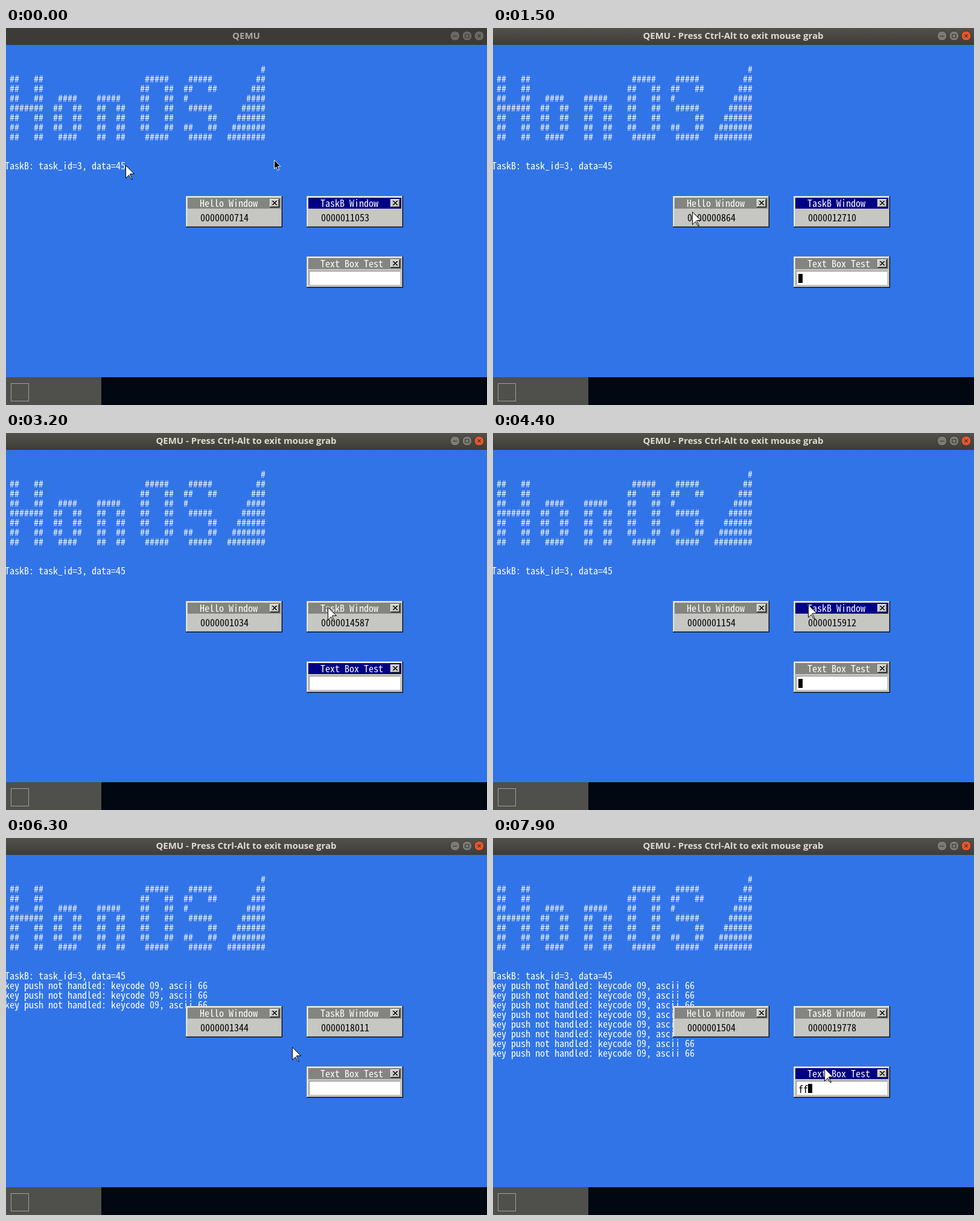
These frames come from a looping animation (797 px wide and 624 px high, 8 s). An HTML page:

```html
<!DOCTYPE html>
<html lang="en">
<head>
<meta charset="utf-8">
<title>Window focus demo</title>
<style>
  html, body { margin: 0; width: 100%; height: 100%; overflow: hidden; background: #3174e7; }
  svg { display: block; }
  text { white-space: pre; }
  .mono { font: 300 16px "Noto Sans Mono CJK JP", "Noto Sans Mono", monospace; }
  .caption { font: 700 15px "Open Sans", "Noto Sans", sans-serif; text-anchor: middle; }
</style>
</head>
<body>
<svg id="stage" width="797" height="624" viewBox="0 0 797 624">
  <defs>
    <linearGradient id="bar" x2="0" y2="1">
      <stop offset="0" stop-color="#53524a"/><stop offset="1" stop-color="#3d3c37"/>
    </linearGradient>
  </defs>
</svg>
<script>
const LOOP = 8000, STEP = 100;
const GRAB = 1000;          // host hands the mouse to the guest
const GLIDE = 400;          // pointer travel time before each stop
const CLICK_DELAY = 400;    // pause between arriving and clicking
const KEY_REPEAT = 145;
const stage = document.getElementById('stage');

function add(parent, tag, attrs, content) {
  const el = document.createElementNS('http://www.w3.org/2000/svg', tag);
  for (const key in attrs) el.setAttribute(key, attrs[key]);
  if (content !== undefined) el.textContent = content;
  parent.appendChild(el);
  return el;
}
const rect = (parent, x, y, width, height, fill) =>
  add(parent, 'rect', { x, y, width, height, fill, 'shape-rendering': 'crispEdges' });
// y is the top of the 16px character cell
const mono = (parent, x, y, fill, content = '') =>
  add(parent, 'text', { x, y: y + 14, fill, class: 'mono' }, content);
const show = (el, on) => el.setAttribute('visibility', on ? 'visible' : 'hidden');
const place = (el, x, y) => el.setAttribute('transform', `translate(${Math.round(x)} ${Math.round(y)})`);
const clamp = (v, lo, hi) => Math.min(hi, Math.max(lo, v));
const smooth = k => k * k * (3 - 2 * k);
const digits = n => String(Math.round(n)).padStart(10, '0');

// Desktop
rect(stage, 0, 0, 797, 624, '#3174e7');
rect(stage, 0, 578, 797, 46, '#010811');
rect(stage, 0, 578, 158, 46, '#4f4f4b');
add(stage, 'rect', { x: 8.5, y: 588.5, width: 29, height: 29, fill: 'none', stroke: '#a0a09c' });

// Console: lettering followed by a growing triangle
const lettering = [
  '',
  ' ##   ##                     #####    #####',
  ' ##   ##                    ##   ##  ##   ##',
  ' ##   ##   ####    #####    ##   ##  #',
  ' #######  ##  ##   ##  ##   ##   ##   #####',
  ' ##   ##  ##  ##   ##  ##   ##   ##       ##',
  ' ##   ##  ##  ##   ##  ##   ##   ##  ##   ##',
  ' ##   ##   ####    ##  ##    #####    #####'
];
lettering.forEach((row, i) =>
  mono(stage, -2, 60 + 16 * i, '#fff', row.padEnd(53 - i) + '#'.repeat(i + 1)));
mono(stage, -2, 220, '#fff', 'TaskB: task_id=3, data=45');
const keyLines = Array.from({ length: 8 }, (_, i) =>
  mono(stage, -2, 236 + 16 * i, '#fff', 'key push not handled: keycode 09, ascii 66'));

// Guest windows
function closeButton(parent, x, y) {
  const g = add(parent, 'g', { transform: `translate(${x} ${y})` });
  rect(g, 0, 0, 16, 14, '#000');
  rect(g, 0, 0, 15, 13, '#fff');
  rect(g, 1, 1, 14, 12, '#848480');
  rect(g, 1, 1, 13, 11, '#c6c6c2');
  for (let row = 0; row < 7; row++) {
    const inset = Math.min(row, 6 - row);
    rect(g, 4 + inset, 3 + row, 2, 1, '#000');
    rect(g, 10 - inset, 3 + row, 2, 1, '#000');
  }
}
function makeWindow(x, y, title) {
  const g = add(stage, 'g', { transform: `translate(${x} ${y})` });
  rect(g, 0, 0, 160, 52, '#000');
  rect(g, 0, 0, 159, 51, '#c6c6c2');
  rect(g, 1, 1, 158, 50, '#848480');
  rect(g, 1, 1, 157, 49, '#fff');
  rect(g, 2, 2, 156, 48, '#c6c6c2');
  const bar = rect(g, 3, 3, 154, 18, '#848480');
  mono(g, 23, 4, '#fff', title);
  closeButton(g, 139, 5);
  return { g, bar };
}
const hello = makeWindow(298, 278, 'Hello Window');
const taskB = makeWindow(498, 278, 'TaskB Window');
const textBox = makeWindow(498, 378, 'Text Box Test');
const helloCount = mono(hello.g, 24, 28, '#000');
const taskCount = mono(taskB.g, 24, 28, '#000');
rect(textBox.g, 4, 24, 151, 23, '#848480');
rect(textBox.g, 5, 25, 150, 22, '#fff');
const typed = mono(textBox.g, 8, 30, '#000');
const caret = rect(textBox.g, 8, 29, 7, 15, '#000');

// Pointers
const pointer = add(stage, 'path', {
  d: 'M.5.5V21.5L5.5 16.5L9.5 23.5H11.5L7.5 15.5V14.5H14.5Z', fill: '#fff', stroke: '#000'
});
const hostPointer = add(stage, 'path', {
  d: 'M.5.5V15L3.8 12L6.2 17.5L8.6 16.5L6.3 11.2H10.8Z', fill: '#000', stroke: '#fff'
});

// Host title bar
const bar = rect(stage, 0, 0, 797, 28, '#3c3b37');
const caption = add(stage, 'text', { x: 398, y: 18, class: 'caption' });
const buttons = ['M-3.5.5H3.5', 'M-3-2.5H3V3H-3Z', 'M-2.5-2.5L2.5 2.5M2.5-2.5L-2.5 2.5'].map((d, i) => {
  const g = add(stage, 'g', { transform: `translate(${744 + 20 * i} 13)` });
  const disc = add(g, 'circle', { r: 8, stroke: '#35342f' });
  add(g, 'path', { d, fill: 'none', stroke: '#3a3934', 'stroke-width': 1.2 });
  return disc;
});

// Pointer stops; a stop with a focus entry ends in a click (null is the desktop)
const stops = [
  { at: -CLICK_DELAY, x: 198, y: 227, focus: taskB },
  { at: 1500, x: 330, y: 304, focus: hello },
  { at: 2500, x: 540, y: 388, focus: textBox },
  { at: 3200, x: 533, y: 288 },
  { at: 3700, x: 522, y: 284, focus: taskB },
  { at: 5300, x: 541, y: 374 },
  { at: 5700, x: 474, y: 346, focus: null },
  { at: 7000, x: 549, y: 381, focus: textBox }
];

function pointerAt(t) {
  let { x, y } = stops[0];
  for (const stop of stops.slice(1)) {
    const k = smooth(clamp((t - stop.at) / GLIDE + 1, 0, 1));
    x += (stop.x - x) * k;
    y += (stop.y - y) * k;
  }
  return [x, y];
}
const focusAt = t => stops.filter(s => 'focus' in s && s.at + CLICK_DELAY <= t).pop().focus;
const presses = (t, from, max) => clamp(Math.floor((t - from) / KEY_REPEAT) + 1, 0, max);

function render(t) {
  const grabbed = t >= GRAB;
  bar.setAttribute('fill', grabbed ? 'url(#bar)' : '#3c3b37');
  caption.textContent = grabbed ? 'QEMU - Press Ctrl-Alt to exit mouse grab' : 'QEMU';
  caption.setAttribute('fill', grabbed ? '#dfdbd2' : '#aaa89f');
  buttons.forEach((b, i) => b.setAttribute('fill', !grabbed ? '#6b6a62' : i === 2 ? '#e9562c' : '#7d7c74'));

  const focused = focusAt(t);
  for (const w of [hello, taskB, textBox]) w.bar.setAttribute('fill', w === focused ? '#000084' : '#848480');

  helloCount.textContent = digits(714 + t * 0.1);
  taskCount.textContent = digits(11053 + t * 1.1044);

  const length = presses(t, 7700, 2);
  typed.textContent = 'f'.repeat(length);
  caret.setAttribute('x', 8 + 8 * length);
  show(caret, (t + 635) % 1005 < 502);   // blinks about once a second

  const lines = presses(t, 6000, keyLines.length);
  keyLines.forEach((line, i) => show(line, i < lines));
  place(pointer, ...pointerAt(t));
  place(hostPointer, 444 + t * 0.006, 218 + t * 0.012);
  show(hostPointer, !grabbed);
}

const start = performance.now();
function frame() {
  const t = (performance.now() - start) % LOOP;
  render(Math.floor(t / STEP) * STEP);
  requestAnimationFrame(frame);
}
render(0);
requestAnimationFrame(frame);
</script>
</body>
</html>
```
